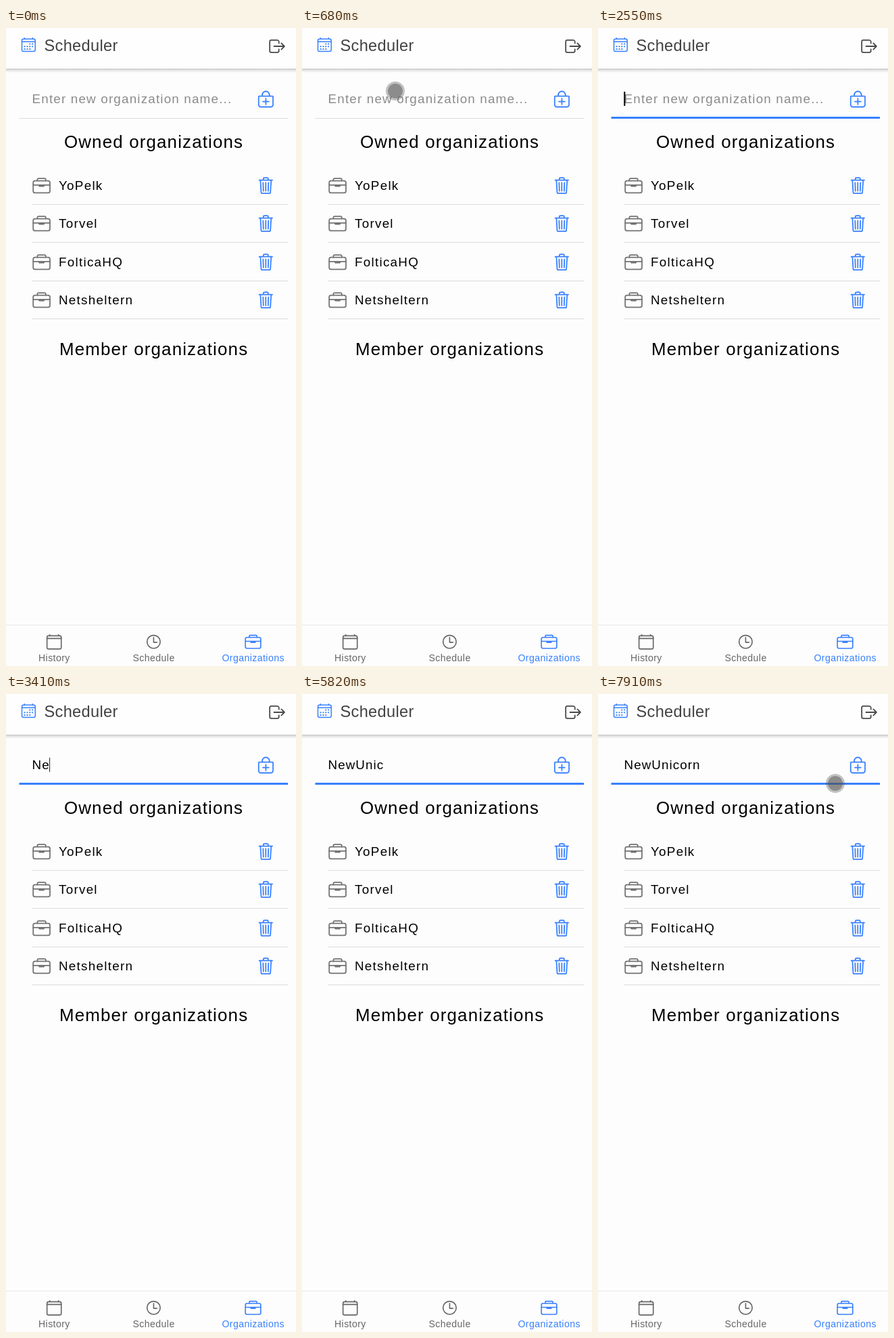
Write an HTML page that moves like this. It is 429 by 942 pixels and loops after 7990 ms.

```html
<!DOCTYPE html>
<html lang="en">
<head>
<meta charset="utf-8">
<title>Scheduler</title>
<style>
  html, body { margin: 0; width: 100%; height: 100%; overflow: hidden; background: #fdfdfd; }
  svg { display: block; width: 429px; height: 942px; }
  text { font-family: "Liberation Sans", Arial, sans-serif; white-space: pre; }
  .item { font-size: 18.87px; letter-spacing: 1.25px; }
  .hint { font-size: 18.87px; letter-spacing: 1.16px; fill: #8b8b8b; }
  .typed { font-size: 18.87px; letter-spacing: 1.03px; }
  .head { font-size: 25.9px; letter-spacing: 1.16px; text-anchor: middle; }
  .title { font-size: 23.6px; letter-spacing: .32px; fill: #424242; }
  .tab { font-size: 14.1px; letter-spacing: .42px; text-anchor: middle; }
  .icon { fill: none; stroke-width: 32; stroke-linecap: round; stroke-linejoin: round; }
</style>
</head>
<body>
<svg viewBox="0 0 429 942" xmlns="http://www.w3.org/2000/svg">
  <defs>
    <linearGradient id="shade" x2="0" y2="1">
      <stop offset="0" stop-color="#c4c4c4"/>
      <stop offset=".35" stop-color="#e2e2e2"/>
      <stop offset="1" stop-color="#fdfdfd"/>
    </linearGradient>
    <g id="briefcase">
      <rect x="32" y="128" width="448" height="320" rx="48"/>
      <path d="M144 128V96a32 32 0 0 1 32-32h160a32 32 0 0 1 32 32v32M480 240H32M320 240v24a8 8 0 0 1-8 8H200a8 8 0 0 1-8-8v-24"/>
    </g>
    <g id="trash">
      <path d="M112 112l20 320c1 18.500 14.400 32 32 32h184c17.700 0 30.900-13.500 32-32l20-320M80 112h352M192 112V72a24 24 0 0 1 24-24h80a24 24 0 0 1 24 24v40M256 176v224M184 176l8 224M328 176l-8 224"/>
    </g>
    <g id="bag">
      <path d="M80 176a16 16 0 0 0-16 16v216c0 30 26 56 56 56h272c30 0 56-25 56-55V192a16 16 0 0 0-16-16zM160 176v-32a96 96 0 0 1 192 0v32M256 240v160M336 320H176"/>
    </g>
    <g id="calendar">
      <rect x="48" y="80" width="416" height="384" rx="48"/>
      <path d="M128 48v32M384 48v32M464 160H48"/>
    </g>
    <g id="clock">
      <circle cx="256" cy="256" r="192"/>
      <path d="M256 128v144h96"/>
    </g>
    <g id="exit">
      <path d="M304 336v40a40 40 0 0 1-40 40H104a40 40 0 0 1-40-40V136a40 40 0 0 1 40-40h152c22 0 48 18 48 40v40M368 336l80-80-80-80M176 256h256"/>
    </g>
    <g id="dots" stroke-width="48">
      <path d="M296 232h0M376 232h0M136 312h0M216 312h0M296 312h0M376 312h0M136 392h0M216 392h0M296 392h0"/>
    </g>
  </defs>

  <rect width="429" height="942" fill="#fdfdfd"/>
  <rect width="429" height="60" fill="#fefefe"/>
  <rect y="60" width="429" height="6" fill="url(#shade)"/>
  <text class="title" x="56.500" y="34">Scheduler</text>

  <text id="hint" class="hint" x="38.5" y="111">Enter new organization name...</text>
  <text id="typed" class="typed" x="38.5" y="111"></text>
  <rect id="line" x="19.500" width="397.500"/>
  <rect id="caret" y="94" height="21"/>

  <text class="head" x="218.6" y="177">Owned organizations</text>
  <text class="head" x="218.6" y="483">Member organizations</text>
  <g id="list"></g>

  <rect y="881" width="429" height="1" fill="#e9e9e9"/>
  <g id="bar"></g>

  <g id="touch">
    <circle r="12.500" fill="none" stroke="#505050" stroke-opacity=".34" stroke-width="3"/>
    <circle r="11" fill="#505050" fill-opacity=".65"/>
  </g>
</svg>
<script>
const LOOP = 7990, BLUE = '#3880ff', GREY = '#666';
const $ = id => document.getElementById(id);

const icon = (name, x, y, color, scale = .0553) =>
  `<use href="#${name}" class="icon" stroke="${color}" ` +
  `transform="translate(${x} ${y}) scale(${scale}) translate(-256 -256)"/>`;

// rows sit on whole pixels
$('list').innerHTML = ['YoPelk', 'Torvel', 'FolticaHQ', 'Netsheltern'].map((name, i) => {
  const y = Math.floor(i * 56.6);
  return `<g transform="translate(0 ${y})">` +
    icon('briefcase', 52.6, 232.7, '#737373') +
    `<text class="item" x="78" y="239">${name}</text>` +
    icon('trash', 384.3, 232.7, BLUE) +
    '<rect x="38.5" y="260" width="378.5" height="1" fill="#dcdcdc"/></g>';
}).join('');

const tabs = [
  ['calendar', 71.2, 'History', GREY],
  ['clock', 218.4, 'Schedule', GREY],
  ['briefcase', 365.5, 'Organizations', BLUE]
];
$('bar').innerHTML = tabs.map(([name, x, label, color]) =>
  icon(name, x, 906.3, color, .0507) +
  `<text class="tab" x="${x + .2}" y="935" fill="${color}">${label}</text>`
).join('') +
  icon('calendar', 33.4, 24.7, BLUE, .0475) + icon('dots', 33.4, 24.7, BLUE, .0475) +
  icon('exit', 401, 27, '#4a4a4a', .0565) + icon('bag', 384.4, 105, BLUE);

// [time, x, y]; an entry without a place lifts the finger
const moves = [
  [0], [70, 383, 926], [150, 296, 600], [220, 285, 455], [300, 275, 355], [370, 235, 240],
  [450, 197, 168], [530, 167, 124], [600, 148, 101], [680, 138, 93], [760, 120, 114],
  [840, 112, 130], [1070],
  [7680, 300, 137], [7760, 322, 137], [7830, 338, 135], [7910, 351, 132]
];
const WORD = 'NewUnicorn';
const keys = [2860, 3410, 3470, 4650, 5030, 5120, 5350, 5900, 6050, 6130];
const FOCUS = 1530;
const blinks = [[2000, 2480], [3950, 4480], [5820, 5900], [6600, 7060], [7610, LOOP]];

function set(el, attrs) {
  for (const k in attrs) el.setAttribute(k, attrs[k]);
}

function draw(t) {
  const [, x, y] = moves.filter(m => m[0] <= t).pop();
  set($('touch'), x === undefined
    ? { visibility: 'hidden' }
    : { visibility: 'visible', transform: `translate(${x} ${y})` });

  const count = keys.filter(k => k <= t).length;
  $('typed').textContent = WORD.slice(0, count);
  set($('hint'), { visibility: count ? 'hidden' : 'visible' });

  const focused = t >= FOCUS;
  set($('line'), focused
    ? { y: 131, height: 3, fill: BLUE }
    : { y: 133, height: 1, fill: '#dadada' });

  const lit = focused && !blinks.some(([a, b]) => t >= a && t < b);
  set($('caret'), {
    visibility: lit ? 'visible' : 'hidden',
    x: count ? Math.round(38.3 + $('typed').getComputedTextLength()) : 38.3,
    width: count ? 1.1 : 2,
    fill: count ? '#333' : '#000'
  });
}

const start = performance.now();
function tick() {
  draw((performance.now() - start) % LOOP);
  requestAnimationFrame(tick);
}
tick();
</script>
</body>
</html>
```
